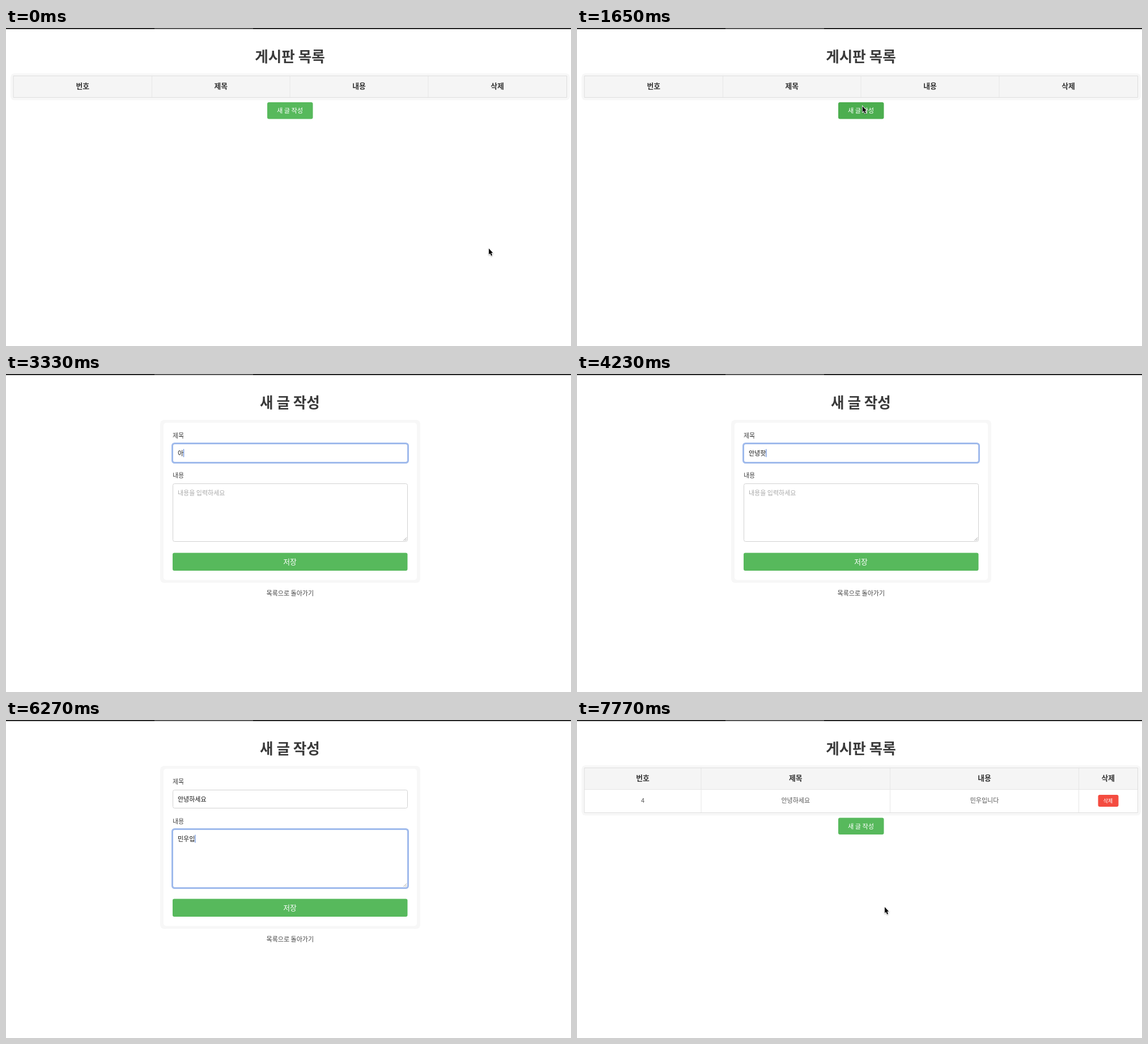
An HTML page with a canvas that plays this animation: 997x561 px, repeating every 8 s.

```html
<!DOCTYPE html>
<html lang="ko">
<head>
<meta charset="utf-8">
<style>
html, body { margin: 0; height: 100%; overflow: hidden; background: #fff; }
canvas { display: block; }
</style>
</head>
<body>
<canvas id="stage" width="997" height="561"></canvas>
<script>
const ctx = document.getElementById('stage').getContext('2d');
const LOOP = 8000, OPEN_FORM = 2100, FOCUS_TITLE = 2460, FOCUS_BODY = 5400, SAVED = 7770;
const GREEN = '#57b95c', GREEN_HOVER = '#4cae4f', HALO = '#f7f7f7';

// [time, text shown from then on], syllables built up jamo by jamo
const titleKeys = [
  [2940, 'ㅇ'], [3330, '아'], [3420, '안'], [3510, '안ㄴ'], [3630, '안녀'], [3750, '안녕'],
  [3960, '안녕ㅎ'], [4050, '안녕하'], [4140, '안녕핫'], [4260, '안녕하세'], [4410, '안녕하셍'], [4680, '안녕하세요']
];
const bodyKeys = [
  [5550, 'ㅁ'], [5640, '미'], [5760, '민'], [5940, '민ㅇ'], [6030, '민우'], [6120, '민웅'],
  [6210, '민우이'], [6270, '민우입'], [6450, '민우입ㄴ'], [6510, '민우입니'], [6570, '민우입닏'], [6630, '민우입니다']
];
// [time, x, y]
const pointerPath = [
  [450, 852, 389], [750, 820, 251], [1140, 820, 251], [1230, 740, 122], [1680, 503, 138],
  [2280, 503, 138], [2310, 505, 142], [7110, 505, 142], [7410, 598, 267], [7680, 543, 330]
];

function box(x, y, w, h, r, fill, stroke, line = 1) {
  ctx.beginPath();
  ctx.roundRect(x, y, w, h, r);
  if (fill) { ctx.fillStyle = fill; ctx.fill(); }
  if (stroke) { ctx.strokeStyle = stroke; ctx.lineWidth = line; ctx.stroke(); }
}

// y is the middle of the glyphs
function text(str, x, y, size, color, weight = 400, align = 'center') {
  ctx.font = `${weight} ${size}px "Noto Sans CJK KR", "Noto Sans CJK", sans-serif`;
  ctx.textAlign = align;
  ctx.fillStyle = color;
  ctx.fillText(str, x, y + size * 0.38);
}

function lines(color, width, ...segments) {
  ctx.beginPath();
  for (const [x1, y1, x2, y2] of segments) { ctx.moveTo(x1, y1); ctx.lineTo(x2, y2); }
  ctx.strokeStyle = color;
  ctx.lineWidth = width;
  ctx.stroke();
}

function drawTopBar() {
  ctx.fillStyle = '#222';
  ctx.fillRect(0, 0, 997, 2);
  ctx.fillStyle = '#555';
  ctx.fillRect(262, 0, 174, 2);
}

function drawList(edges, row, hover) {
  const bottom = row ? 163.5 : 122.5;
  text('게시판 목록', 501, 50, 25.6, '#3a3a3a', 700);
  box(8, 80, 987, bottom - 75, 7, HALO);
  box(13, 85, 976.5, bottom - 85, 0, '#fff');
  box(13, 85, 976.5, 37, 0, '#f5f5f5');
  const middle = i => (edges[i] + edges[i + 1]) / 2;
  ['번호', '제목', '내용', '삭제'].forEach((s, i) => text(s, middle(i), 102, 12.8, '#333', 700));
  lines('#e6e6e6', 1, [13, 122.5, 989, 122.5], ...edges.slice(1, -1).map(x => [x, 85, x, bottom]));
  box(13, 84.5, 976.5, bottom - 84.5, 0, null, '#dedede');
  if (row) {
    row.forEach((s, i) => text(s, middle(i), 142, 11, '#555'));
    box(919.5, 132, 36, 21, 3, '#f44c40');
    text('삭제', 937, 142.5, 9, '#fff', 500);
  }
  const y = row ? 172.5 : 131;
  box(461, y, 80.5, 29.5, 3, hover ? GREEN_HOVER : GREEN);
  text('새 글 작성', 501, y + 14.8, 11.2, '#fff', 500);
}

function drawField(t, y, h, keys, hint, focused) {
  box(294.5, y, 414, h, 3, '#fff', '#d2d2d2');
  if (focused) box(293.5, y - 1, 416, h + 2, 4, null, '#9fbaec', 3);
  const key = keys.findLast(k => k[0] <= t);
  const value = key ? key[1] : '';
  text(value || hint, 303, y + 16, 11, value ? '#111' : '#a9a9a9', 400, 'left');
  const since = t - (key ? key[0] : FOCUS_TITLE);
  if (focused && since % 1000 < 500) {
    const x = 303.5 + ctx.measureText(value).width;
    lines('#3c6fd0', 1, [x, y + 9, x, y + 23]);
  }
}

function drawForm(t, hover) {
  text('새 글 작성', 501, 50, 25.6, '#3a3a3a', 700);
  box(272, 81, 459, 287.5, 7, HALO);
  box(278, 86, 447, 277.5, 5, '#fff');
  text('제목', 294, 109, 11, '#444', 400, 'left');
  text('내용', 294, 178.5, 11, '#444', 400, 'left');
  drawField(t, 123.5, 32, titleKeys, '제목을 입력하세요', t >= FOCUS_TITLE && t < FOCUS_BODY);
  drawField(t, 193.5, 102, bodyKeys, '내용을 입력하세요', t >= FOCUS_BODY);
  lines('#888', 0.8, [701.5, 294, 707, 288.5], [704.5, 294, 707, 291.5]);
  box(294, 315.5, 414.5, 31.5, 3, hover ? GREEN_HOVER : GREEN);
  text('저장', 501, 331, 12.8, '#fff', 500);
  text('목록으로 돌아가기', 501.3, 386.5, 11, '#444', 500);
}

function pointerAt(t) {
  const next = pointerPath.findIndex(p => p[0] > t);
  if (next === 0) return pointerPath[0].slice(1);
  if (next < 0) return pointerPath.at(-1).slice(1);
  const [t0, x0, y0] = pointerPath[next - 1], [t1, x1, y1] = pointerPath[next];
  const u = (t - t0) / (t1 - t0), e = 1 - (1 - u) ** 2;
  return [x0 + (x1 - x0) * e, y0 + (y1 - y0) * e];
}

function drawArrow(x, y) {
  ctx.save();
  ctx.translate(x, y);
  const shape = new Path2D('M0 0V10.5L2.3 8.4L4.1 12.8L6 12L4.2 7.8H7.2Z');
  ctx.strokeStyle = '#fff';
  ctx.lineWidth = 1.6;
  ctx.shadowColor = 'rgba(0,0,0,.3)';
  ctx.shadowBlur = 2;
  ctx.shadowOffsetY = 1;
  ctx.stroke(shape);
  ctx.shadowColor = 'transparent';
  ctx.fillStyle = '#000';
  ctx.fill(shape);
  ctx.restore();
}

function drawBeam(x, y) {
  lines('#333', 1.1, [x, y - 5.5, x, y + 5.5], [x - 3, y - 6, x + 3, y - 6],
    [x - 3, y + 6, x + 3, y + 6], [x - 1.5, y, x + 1.5, y]);
}

function render(now) {
  const t = (now + 3) % LOOP;
  const [x, y] = pointerAt(t);
  ctx.fillStyle = '#fff';
  ctx.fillRect(0, 0, 997, 561);
  drawTopBar();
  if (t < OPEN_FORM) {
    drawList([13, 257.5, 501, 745, 989], null, x < 541 && y > 131);
  } else if (t < SAVED) {
    drawForm(t, y > 315);
  } else {
    drawList([13, 219, 552.5, 885.5, 989], ['4', '안녕하세요', '민우입니다'], false);
  }
  const hidden = t >= 2940 && t < 7110;
  const overField = t >= 2280 && y < 296;
  if (!hidden) (overField ? drawBeam : drawArrow)(x, y);
  requestAnimationFrame(() => render(performance.now() - start));
}

const start = performance.now();
render(0);
</script>
</body>
</html>
```
